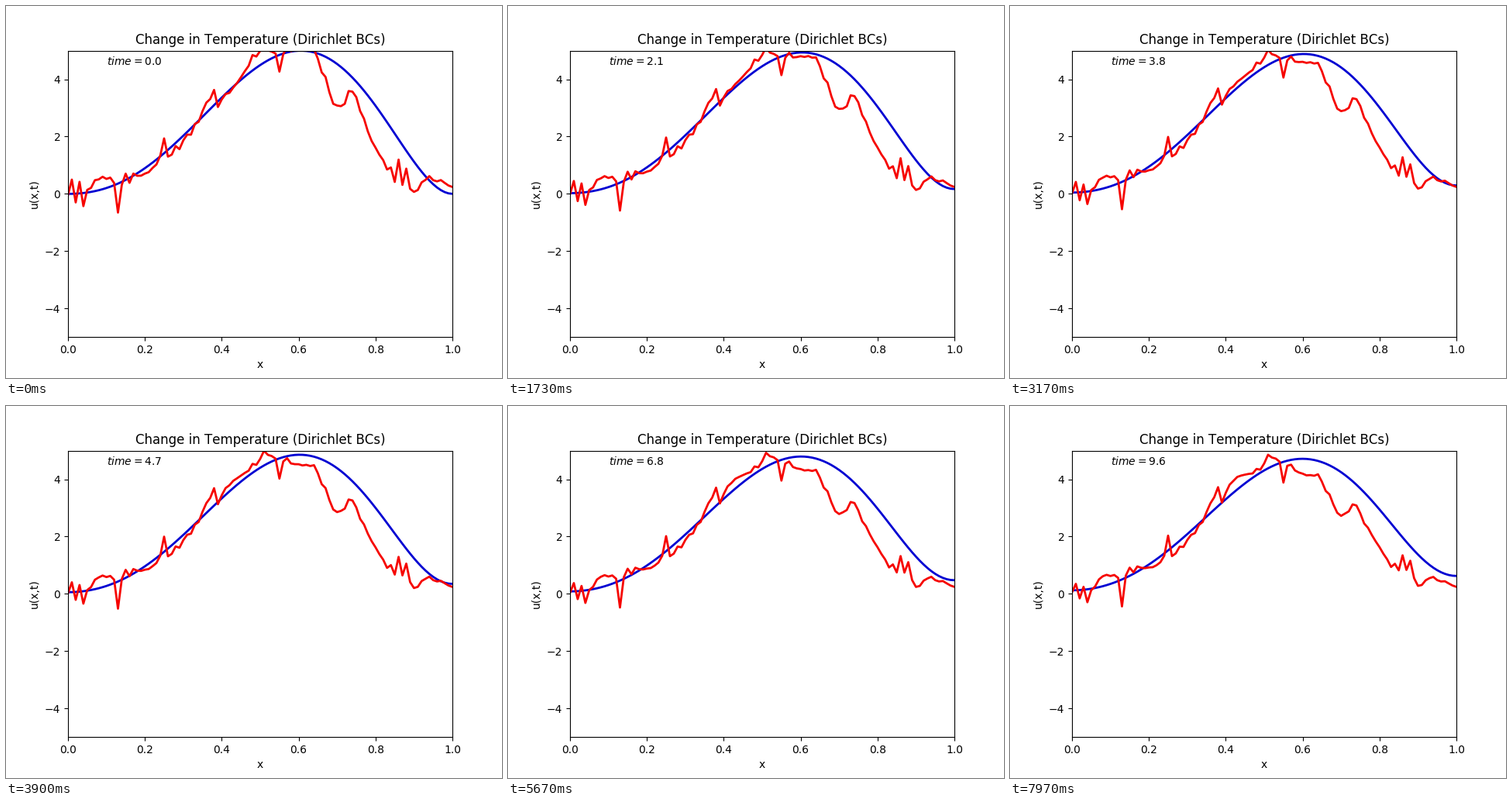
A matplotlib script for the animation above (8 s loop, 640 px wide and 480 px high).

```python
import numpy as np
import matplotlib.pyplot as plt
from matplotlib.animation import FuncAnimation

FRAMES = 240
DT = 0.04            # simulated time per frame
END = DT * FRAMES
K = 3.125e-4         # diffusivity
TAU = 8.0            # settling time of the noisy profile

plt.rcParams["text.kerning_factor"] = 6

i = np.arange(101)
x = i / 100


def bump(centre, width):
    return np.exp(-((x - centre) / width)**2)


# Smooth profile: cosine modes, zero slope at both ends
def initial(s):
    return s**2 * (1 - s)**2 * (16.6 + 79.4 * s + 62.6 * s**2)


n = np.arange(80)
mid = (np.arange(2000) + 0.5) / 2000
coef = 2 * np.mean(initial(mid) * np.cos(np.pi * np.outer(n, mid)), axis=1)
coef[0] /= 2
modes = np.cos(np.pi * np.outer(x, n))


def smooth(t):
    return modes @ (coef * np.exp(-K * (np.pi * n)**2 * t))


# Noisy profile: a few corners, a slow drift and a fading zigzag
CORNERS = [(0, 0.2), (4, -0.1), (8, 0.65), (12, 0.35), (13, -0.7), (14, 0.45),
           (22, 0.87), (24, 1.2), (25, 2.1), (26, 1.3), (34, 2.5), (38, 3.7),
           (39, 3.05), (51, 5.2), (54, 4.9), (55, 4.2), (56, 5.0), (64, 5.05),
           (70, 2.9), (74, 3.6), (83, 0.75), (88, 0.75), (90, 0.1),
           (93, 0.55), (100, 0.25)]
base = np.interp(i, *zip(*CORNERS))
drift = (0.3 * bump(0.16, 0.06) + 0.4 * bump(0.42, 0.03)
         - 0.45 * bump(0.49, 0.03) - 0.95 * bump(0.62, 0.07)
         - 0.5 * bump(0.75, 0.03) + 0.35 * bump(0.87, 0.04))
zigzag = -0.5 * np.cos(np.pi * i * 87 / 86) * (bump(0.02, 0.02) + bump(0.86, 0.025))
jitter = np.random.default_rng(4).normal(0, 0.09, i.size)


def noisy(t):
    settled = np.expm1(-t / TAU) / np.expm1(-END / TAU)
    return base + drift * settled + (zigzag + jitter) * (1 - 0.4 * settled)


fig, ax = plt.subplots(figsize=(6.4, 4.8), dpi=100)
ax.set(xlim=(0, 1), ylim=(-5, 5), xlabel="x", ylabel="u(x,t)",
       title="Change in Temperature (Dirichlet BCs)")
blue, = ax.plot([], [], color="#0000d2", lw=2)
red, = ax.plot([], [], color="#f60400", lw=2)
label = ax.text(0.1, 4.5, "")


def update(frame):
    t = (frame + 0.5) * DT
    blue.set_data(x, smooth(t))
    red.set_data(x, noisy(t))
    label.set_text(f"$time = {t:.1f}$")
    return blue, red, label


anim = FuncAnimation(fig, update, frames=FRAMES, interval=8000 / FRAMES,
                     repeat=True, repeat_delay=0)
plt.show()
```
